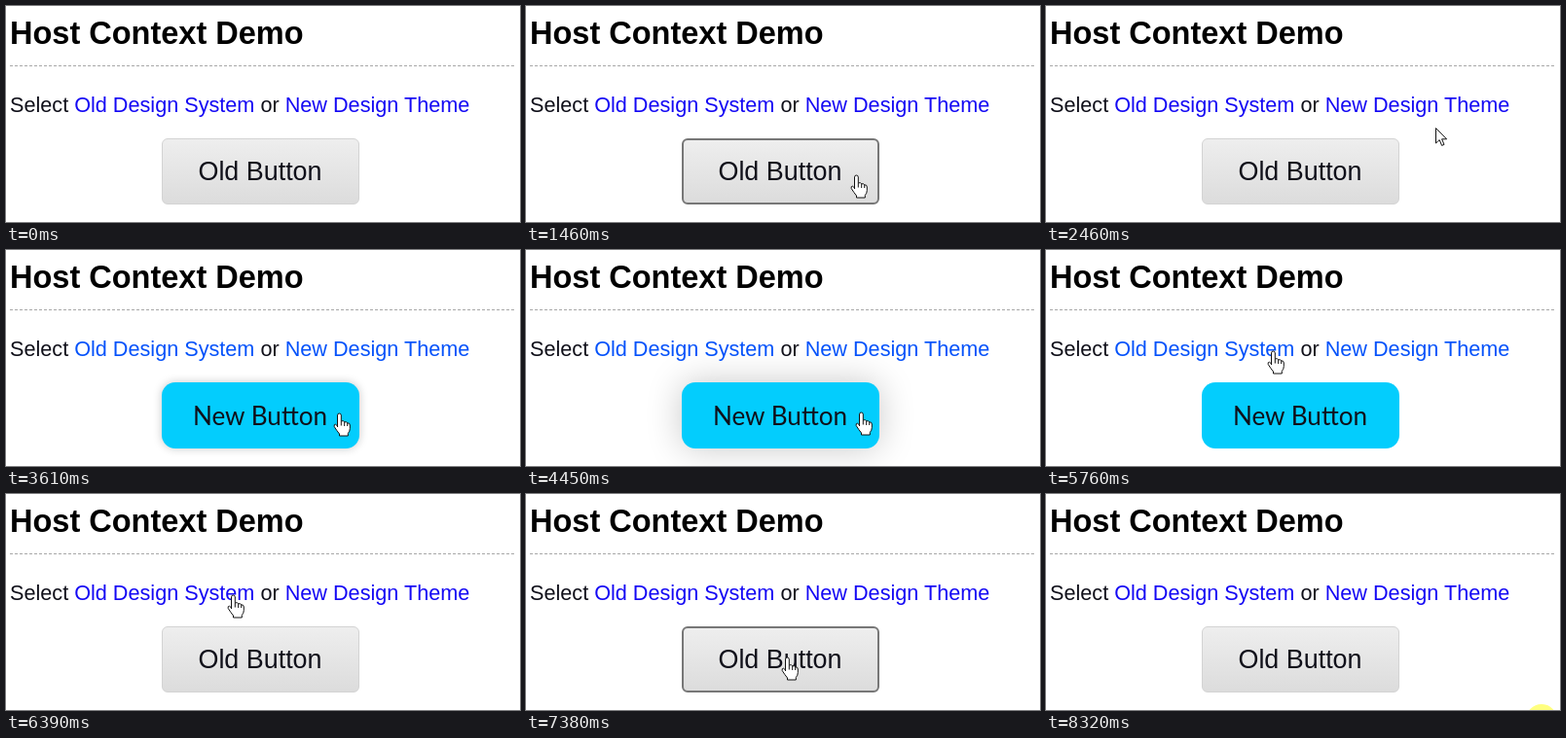
An HTML page for the animation above (8390 ms loop, 528 px wide and 222 px high).

```html
<!DOCTYPE html>
<html lang="en">
<head>
<meta charset="utf-8">
<title>Host Context Demo</title>
<style>
  html, body { margin: 0; width: 100%; height: 100%; overflow: hidden; background: #fff; }
  svg { position: absolute; left: 0; top: 0; font-family: "Liberation Sans", Arial, sans-serif; }
  text { white-space: pre; fill: #10101a; }
  #button {
    position: absolute; left: 160px; top: 136px; width: 203px; height: 68px;
    box-sizing: border-box; border: 1px solid #d3d3d3; border-radius: 6px;
    background: linear-gradient(#eee, #dcdcdc);
  }
  #button.hover { border: 2px solid #777; }
  #button.new { border: 0; border-radius: 14px; background: #03cdfd; }
  .title { font-size: 32.5px; font-weight: bold; fill: #000; }
  .link { fill: #1408f4; }
  .new + svg .link { fill: #0552fa; }
  .caption { font-size: 26.9px; text-anchor: middle; }
  .new + svg .caption { font: 26.1px Lato, sans-serif; }
  .cursor { fill: #fff; stroke: #111; stroke-linejoin: round; }
</style>
</head>
<body>
<div id="button"></div>
<svg width="528" height="222" viewBox="0 0 528 222">
  <text class="title" x="4" y="39">Host Context Demo</text>
  <path d="M4 61.5H524" stroke="#a8a8a8" stroke-dasharray="3 2"/>
  <text x="4" y="109" font-size="21.65">Select <tspan class="link">Old Design System</tspan> or <tspan class="link">New Design Theme</tspan></text>
  <text id="caption" class="caption" x="261" y="179">Old Button</text>
  <circle id="click" r="16" fill="#ff0" fill-opacity=".5"/>
  <g id="pointer">
    <path id="arrow" class="cursor" d="M.5 .5V16L4.2 12.6 6.6 18.4 9 17.4 6.6 11.8H11.6Z"/>
    <g id="hand" class="cursor" transform="translate(.5 -.5)">
      <path d="M-2 14.5V2.4a1.9 1.9 0 0 1 3.8 0V8.3q3-.6 3.4 1 2.6-.5 3 1 2.6-.2 2.6 2.2V16q0 3-2 5V23.5H0V21.5Q-2.5 18.5-5.3 14q-.6-2.4 1.3-2.3 1 .3 2 2Z"/>
      <path d="M1.8 8.3V13M5.2 9.3V13.5M8.2 10.3V13.5" fill="none"/>
    </g>
  </g>
</svg>
<script>
const LOOP = 8390, TICKS = 109, TICK = LOOP / TICKS, LEAD = 12;

// Pointer moves; it starts and ends below the stage.
const home = { x: 440, y: 223 };
const moves = [
  { from: 5, to: 10, x: 382, y: 192 },
  { from: 11, to: 19, x: 339, y: 174 },
  { from: 21, to: 32, x: 400, y: 125 },
  { from: 32, to: 34, x: 436, y: 105 },
  { from: 38, to: 46, x: 342, y: 168 },
  { from: 56, to: 66, x: 425, y: 150 },
  { from: 66, to: 72, x: 233, y: 104 },
  { from: 84, to: 92, x: 262, y: 166 },
  { from: 95, to: 106, x: 509, y: 232 }
];
const clickTicks = [34, 73, 108];

const $ = id => document.getElementById(id);
const show = (el, on) => { el.style.display = on ? "" : "none"; };
const within = (v, a, b) => v >= a && v < b;

function ease(tick, from, to) {
  const p = Math.min(1, Math.max(0, (tick - from) / (to - from)));
  return p * p * (3 - 2 * p);
}

function pointerAt(tick) {
  return moves.reduce(({ x, y }, m) => {
    const p = ease(tick, m.from, m.to);
    return { x: x + (m.x - x) * p, y: y + (m.y - y) * p };
  }, home);
}

function draw(ms) {
  const tick = Math.min(TICKS - 1, Math.floor((ms % LOOP + LEAD) / TICK));
  const { x, y } = pointerAt(tick);
  const isNew = within(tick, 36, 77);
  const onButton = within(x, 160, 363) && within(y, 136, 204);
  const onLink = within(y, 90, 114) && (within(x, 70, 256) || within(x, 287, 477));
  const blur = 36 * (ease(tick, 44, 53) - ease(tick, 59, 65));

  $("button").className = isNew ? "new" : onButton ? "hover" : "";
  $("button").style.boxShadow = blur ? `0 0 ${blur}px rgba(0,0,0,.22)` : "none";
  $("caption").textContent = isNew ? "New Button" : "Old Button";
  $("caption").setAttribute("y", isNew ? 180 : 179);

  const place = `translate(${Math.round(x)} ${Math.round(y)})`;
  $("pointer").setAttribute("transform", place);
  $("click").setAttribute("transform", place);
  show($("hand"), onButton || onLink);
  show($("arrow"), !(onButton || onLink));
  show($("click"), clickTicks.some(c => within(tick, c, c + 2)));
}

const start = performance.now();
function frame() {
  draw(performance.now() - start);
  requestAnimationFrame(frame);
}
frame();
</script>
</body>
</html>
```
